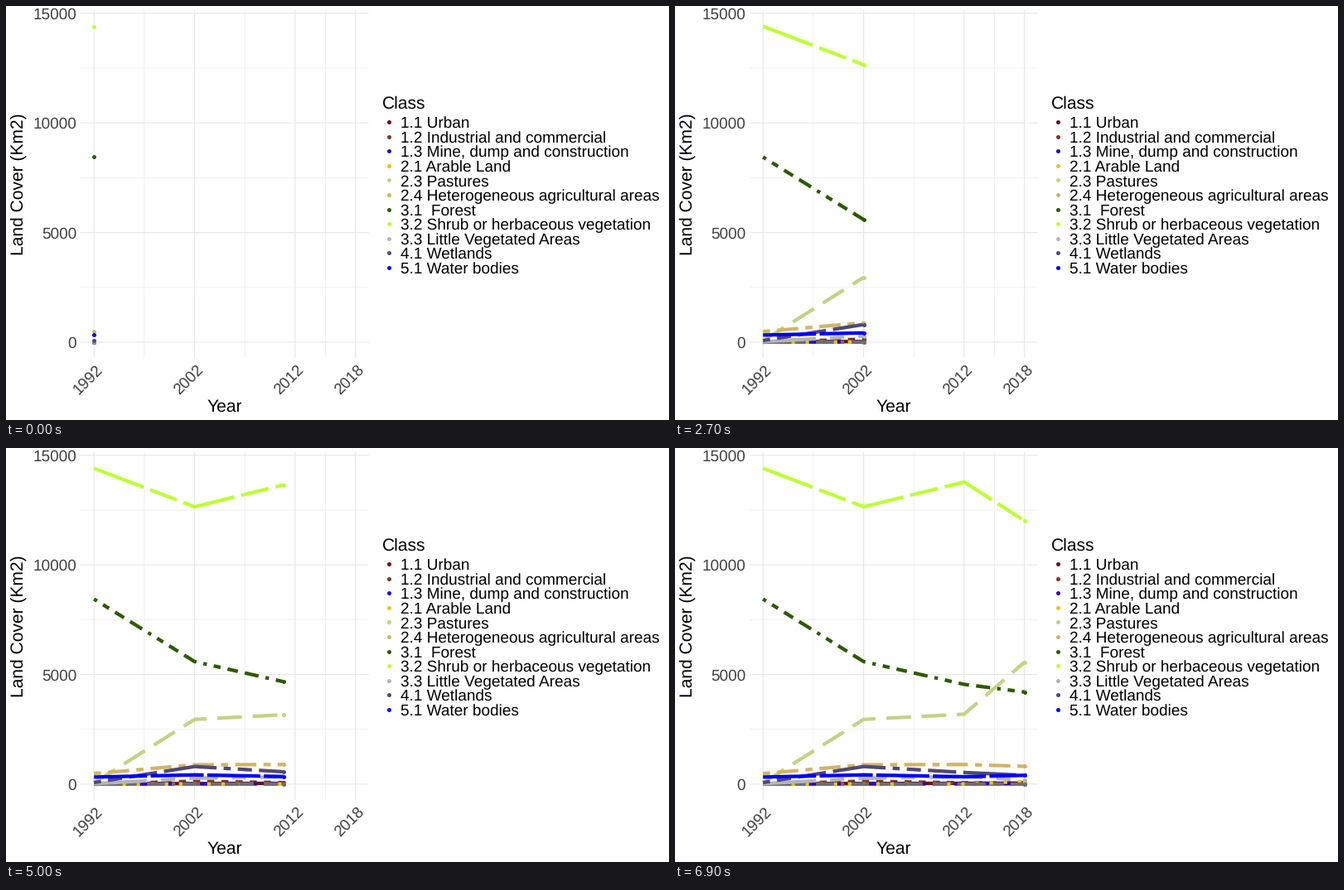
These frames come from a looping animation (800 by 500 pixels, 8 s). A matplotlib script:

```python
import matplotlib.pyplot as plt
import numpy as np
from matplotlib.animation import FuncAnimation

W, H, DPI = 800, 500, 100
PX = 72 / DPI
FRAMES, INTERVAL = 80, 100

plt.rcParams["font.family"] = "Liberation Sans"
plt.rcParams["text.hinting"] = "none"

YEARS = [1992, 2002, 2012, 2018]
KEY_FRAMES = [0, 27, 53, 69]
NA_COLOR = "#6E6E6E"

# label (None: not in the legend), colour, dash lengths as hex digits, km2 per year
CLASSES = [
    ("1.1 Urban", "#72090B", "", (15, 25, 35, 45)),
    ("1.2 Industrial and commercial", "#7E3428", "22", (10, 130, 60, 50)),
    ("1.3 Mine, dump and construction", "#2E00BE", "42", (5, 10, 15, 15)),
    (None, NA_COLOR, "44", (0, 2, 3, 4)),
    ("2.1 Arable Land", "#E3C81A", "13", (0, 5, 5, 120)),
    (None, NA_COLOR, "1343", (0, 0, 0, 0)),
    ("2.3 Pastures", "#C3D385", "73", (60, 2950, 3190, 5560)),
    ("2.4 Heterogeneous agricultural areas", "#D1B468", "2262",
     (480, 880, 895, 810)),
    ("3.1  Forest", "#2D5A00", "12223242", (8440, 5590, 4550, 4200)),
    ("3.2 Shrub or herbaceous vegetation", "#BCFF37", "F282",
     (14405, 12650, 13780, 12010)),
    ("3.3 Little Vegetated Areas", "#B5B5B5", "F4448444", (20, 270, 330, 200)),
    ("4.1 Wetlands", "#504878", "224282F2", (70, 800, 530, 400)),
    ("5.1 Water bodies", "#0000FF", "F1", (320, 420, 335, 400)),
]


def x_pos(year):
    return 106.2 + (np.asarray(year) - 1992) * 12.135


def y_pos(area):
    return 405.9 - np.asarray(area) * 0.026473


fig = plt.figure(figsize=(W / DPI, H / DPI), dpi=DPI, facecolor="white")
ax = fig.add_axes([0, 0, 1, 1])
ax.set(xlim=(0, W), ylim=(H, 0))
ax.axis("off")


def label(x, y, text, size, color="black", ha="left", angle=0):
    ax.text(x, y, text, fontsize=size * PX, color=color, ha=ha,
            va="baseline", rotation=angle, rotation_mode="anchor")


def grid(xs, ys, width):
    style = dict(color="#E7E7E7", lw=width * PX, snap=False, zorder=0)
    for x in xs:
        ax.plot([x, x], [5.5, 424.5], **style)
    for y in ys:
        ax.plot([90.4, 437.2], [y, y], **style)


def dot(x, y, color):
    return ax.plot(x, y, "o", color=color, ms=5 * PX, mew=0, zorder=3)[0]


grid(x_pos([1997, 2007, 2015]), y_pos([2500, 7500, 12500]), 0.6)
grid(x_pos(YEARS), y_pos([0, 5000, 10000, 15000]), 1.1)

for area in (0, 5000, 10000, 15000):
    label(85, y_pos(area) + 6.8, str(area), 19, "#404040", "right")
for year in YEARS:
    label(x_pos(year) - 3.9, 454.8, str(year), 19, "#404040", "center", 45)
label(263.5, 490, "Year", 21, ha="center")
label(20.5, 215, "Land Cover (Km2)", 21, ha="center", angle=90)

label(454, 124, "Class", 21)
shown = [(name, color) for name, color, *_ in CLASSES if name]
for row, (name, color) in enumerate(shown):
    y = 140.2 + 17.56 * row
    dot(462.3, y, color)
    label(476, y + 7, name, 19)

lines, tips = [], []
for _, color, dashes, _ in CLASSES:
    style = (0, tuple(int(d, 16) for d in dashes)) if dashes else "-"
    lines += ax.plot([], [], color=color, lw=4.27 * PX, linestyle=style,
                     solid_capstyle="butt", dash_capstyle="butt",
                     solid_joinstyle="round", dash_joinstyle="round", zorder=2)
    tips.append(dot([], [], color))


def update(frame):
    step = min(frame, KEY_FRAMES[-1])
    now = np.interp(step, KEY_FRAMES, YEARS)
    years = [y for y in YEARS if y < now] + [now]
    xs = x_pos(years)
    for (*_, areas), line, tip in zip(CLASSES, lines, tips):
        ys = y_pos(np.interp(years, YEARS, areas))
        line.set_data(xs, ys)
        tip.set_data(xs[-1:], ys[-1:])
    return lines + tips


anim = FuncAnimation(fig, update, frames=FRAMES, interval=INTERVAL,
                     repeat=True, repeat_delay=0)
plt.show()
```
